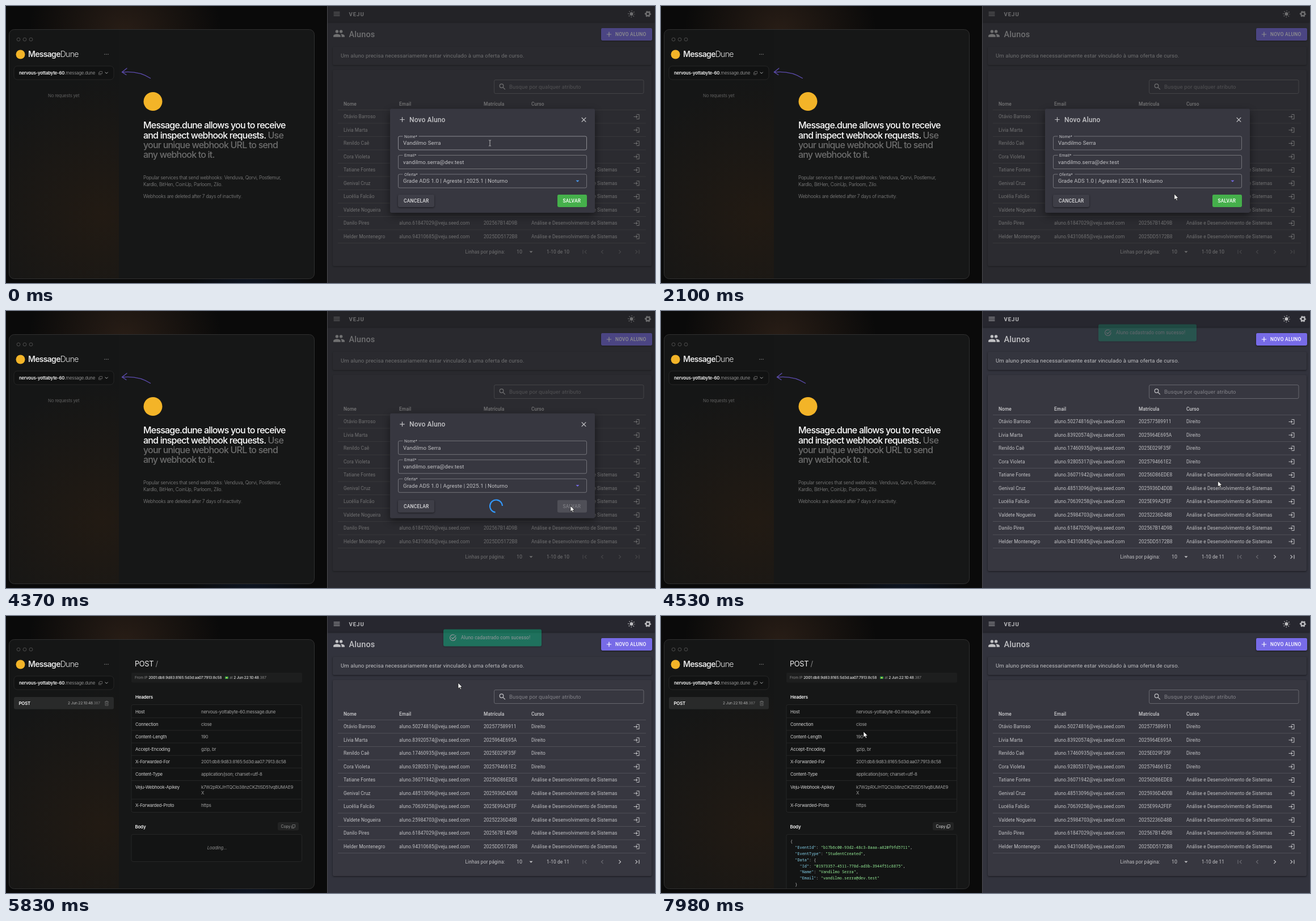
An HTML page for the animation above (8 s loop, 1144 by 489 pixels).

```html
<!DOCTYPE html>
<html lang="pt">
<head>
<meta charset="utf-8">
<title>Webhook demo</title>
<style>
  html, body { margin: 0; width: 100%; height: 100%; overflow: hidden; background: #0a0a0a; }
  svg { display: block; width: 100vw; height: 100vh; }
  text { white-space: pre; }
  .hook text { font-family: Inter, sans-serif; letter-spacing: -.025em; }
  .app text { font-family: Roboto, sans-serif; letter-spacing: .0107em; }
  .app .btn { font-weight: 500; letter-spacing: .0286em; }
  .hook .code text { font-family: "Noto Sans Mono", monospace; letter-spacing: 0; }
  .mid { font-weight: 500; }
  .bold { font-weight: 600; }
  .thin { font-weight: 300; }
</style>
</head>
<body>
<svg id="stage" viewBox="0 0 1144 489" preserveAspectRatio="none"></svg>
<script>
const LOOP = 8000;
const SOFT = '#ffffffb2', SURFACE = '#373740', PRIMARY = '#776be7', GREEN = '#45b04b';

// Markup helpers
const text = (x, y, s, size, fill = SOFT, extra = '') =>
  `<text x="${x}" y="${y}" font-size="${size}" fill="${fill}" ${extra}>${s}</text>`;
const rect = (x, y, w, h, fill, extra = '') =>
  `<rect x="${x}" y="${y}" width="${w}" height="${h}" fill="${fill}" ${extra}/>`;
const line = (x1, y, x2, color) =>
  `<path d="M${x1} ${y}H${x2}" stroke="${color}" stroke-width=".8"/>`;
const stroke = (d, color, width, extra = '') =>
  `<path d="${d}" fill="none" stroke="${color}" stroke-width="${width}" ${extra}/>`;
// Icons are drawn on a 24 unit grid and centred on x, y.
const icon = (cx, cy, scale, body, fill = SOFT) =>
  `<g transform="translate(${cx} ${cy}) scale(${scale}) translate(-12 -12)" fill="${fill}">${
    body[0] === '<' ? body : `<path d="${body}"/>`}</g>`;

const icons = {
  menu: 'M3 18h18v-2H3zm0-5h18v-2H3zm0-7v2h18V6z',
  plus: 'M19 13h-6v6h-2v-6H5v-2h6V5h2v6h6z',
  close: 'M19 6.4 17.6 5 12 10.6 6.4 5 5 6.4l5.6 5.6L5 17.6 6.4 19l5.6-5.6 5.6 5.6 1.4-1.4-5.6-5.6z',
  down: 'M7 10l5 5 5-5z',
  enter: 'M11 7 9.6 8.4l2.6 2.6H2v2h10.2l-2.6 2.6L11 17l5-5zm9 12h-8v2h8c1.1 0 2-.9 2-2V5c0-1.1-.9-2-2-2h-8v2h8z',
  first: 'M18.4 16.6 13.8 12l4.6-4.6L17 6l-6 6 6 6zM6 6h2v12H6z',
  prev: 'M15.4 7.4 14 6l-6 6 6 6 1.4-1.4-4.6-4.6z',
  next: 'M10 6 8.6 7.4l4.6 4.6-4.6 4.6L10 18l6-6z',
  last: 'M5.6 7.4l4.6 4.6-4.6 4.6L7 18l6-6-6-6zM16 6h2v12h-2z',
  people: '<circle cx="16" cy="8" r="3"/><circle cx="8" cy="8" r="3"/><path d="M8 13c-2.3 0-7 1.2-7 3.5V19h14v-2.5C15 14.2 10.3 13 8 13zm8 0-1 .1c1.2.8 2 1.9 2 3.4V19h6v-2.5C23 14.2 18.3 13 16 13z"/>',
  search: '<path d="M14.5 14.5 20 20M15 9.5a5.5 5.5 0 1 1-11 0 5.5 5.5 0 0 1 11 0z" fill="none" stroke="#ffffffb2" stroke-width="2"/>',
  sun: '<circle cx="12" cy="12" r="5"/><circle cx="12" cy="12" r="9" fill="none" stroke="#ffffffb2" stroke-width="3" stroke-dasharray="2 5.07" stroke-dashoffset="1"/>',
  gear: '<g fill="none" stroke="#ffffffb2"><circle cx="12" cy="12" r="5.5" stroke-width="4"/><circle cx="12" cy="12" r="8.4" stroke-width="2" stroke-dasharray="4.4 4.4" stroke-dashoffset="2.2"/></g>',
  check: '<path d="M20.5 10a9 9 0 1 1-4-6M7 11l4 4L21 5" fill="none" stroke="#fff" stroke-width="2"/>'
};

// Left: request inspector
const hookShell = `
  ${rect(0, 0, 566, 489, '#0a0a0a')}
  ${rect(0, 0, 566, 489, 'url(#cold)')}${rect(0, 0, 566, 489, 'url(#top)')}
  ${rect(5.5, 41.5, 538, 440, '#161717', 'rx="9"')}
  <path id="side" d="M199 42H14.5a9 9 0 0 0-9 9V472.5a9 9 0 0 0 9 9H199z" fill="#151616"/>
  <use href="#side" style="fill:url(#warm)"/><path d="M199 42H14.5a9 9 0 0 0-9 9V472.5a9 9 0 0 0 9 9H199z" fill="url(#warm)"/>
  ${rect(5.5, 41.5, 538, 440, 'none', 'rx="9" stroke="#303030"')}
  ${[22, 33, 44].map(x => `<circle cx="${x}" cy="59" r="2.9" fill="none" stroke="#5a5a5a" stroke-width=".8"/>`).join('')}
  <circle cx="25.5" cy="85.5" r="8" fill="#f3b428"/>
  ${text(39, 90.3, 'Message<tspan font-weight="300">Dune</tspan>', 14, '#e4e4e4', 'class="bold" style="letter-spacing:-.05em"')}
  ${[174, 177, 180].map(x => `<circle cx="${x}" cy="85.3" r=".7" fill="#999"/>`).join('')}
  ${rect(14, 106, 176, 24, '#111212', 'rx="6" stroke="#2b2b2b" stroke-width=".8"')}
  ${text(23, 120.6, 'nervous-yottabyte-60<tspan font-weight="400" fill="#8d8d8d">.message.dune</tspan>', 7.8, '#f2f2f2', 'class="bold"')}
  ${stroke('M165 115.5h4.5v4h-4.5zM163.5 117v4.2h4.5', '#777', .7)}
  ${stroke('M174.7 116.7l2.5 2.5 2.5-2.5', '#aaa', 1)}`;

const welcome = `
  ${text(74, 161, 'No requests yet', 7.8, '#5f5f5f')}
  <g id="arrow">${stroke('M254.5 127.5Q234 114 205 116.8M213 110 204.5 116.8 212 121.5', '#5d4cb0', 1.3, 'stroke-linecap="round"')}</g>
  <circle cx="259" cy="168.5" r="16.5" fill="#f3b428"/>
  <g class="mid">${[
    '<tspan fill="#fff">Message.dune allows you to receive</tspan>',
    '<tspan fill="#fff">and inspect webhook requests.</tspan> Use',
    'your unique webhook URL to send', 'any webhook to it.'
  ].map((s, i) => text(242, 216.3 + i * 17.3, s, 16, '#6d6d6d', 'style="letter-spacing:-.05em"')).join('')}</g>
  <g class="thin">
  ${text(242, 306, 'Popular services that send webhooks: Venduva, Qorvi, Postlemur,', 8.4, '#8a8a8a')}
  ${text(242, 318, 'Kardlo, BitHen, CoinUp, Parloom, Zilo.', 8.4, '#8a8a8a')}
  ${text(242, 338.6, 'Webhooks are deleted after 7 days of inactivity.', 8.4, '#8a8a8a')}</g>`;

const ip = '2001:db8:9d83:8165:5d3d:aa07:7913:8c58';
const headers = [
  ['Host', 'nervous-yottabyte-60.message.dune'], ['Connection', 'close'], ['Content-Length', '190'],
  ['Accept-Encoding', 'gzip, br'], ['X-Forwarded-For', ip],
  ['Content-Type', 'application/json; charset=utf-8'],
  ['Veju-Webhook-Apikey', 'k7W2pRXJHTQClo38nzCKZtISD51vqBUMAE9'], ['X-Forwarded-Proto', 'https']
];
const headerY = i => 171.6 + i * 22.15 + (i > 6 ? 10.6 : 0);
const payload = [
  '{', '  "EventId": "b17b6c00-93d2-48c3-8aaa-a820f9fd5711",', '  "EventType": "StudentCreated",',
  '  "Data": {', '    "Id": "01973357-4511-778d-ad3b-3944f51c8875",',
  '    "Name": "Vandilmo Serra",', '    "Email": "vandilmo.serra@dev.test"', '  }'
];
const paint = s => s.replace(/("[^"]*")(:?)/g, (_, word, colon) =>
  `<tspan fill="${colon ? '#86d5ee' : '#98f29a'}">${word}</tspan>${colon}`);

const request = `
  ${rect(14, 143, 176, 21.5, '#292a2a', 'rx="3"')}
  ${text(22.5, 156.8, 'POST', 7.8, '#fff', 'class="bold"')}
  ${text(109, 156.3, '2 Jun 22:10:48<tspan fill="#777">.387</tspan>', 6.6, '#b0b0b0')}
  ${stroke('M174 151.5h7M176 151.5v-1.3h3v1.3M175 151.5v6.5h5v-6.5M176.8 153.2v3.3M178.3 153.2v3.3', '#777', .7)}
  ${text(227, 89.2, 'POST <tspan fill="#888">/</tspan>', 12.8, '#f0f0f0')}
  ${rect(221, 100, 301, 17.5, '#1d1e1e', 'rx="2"')}
  ${text(227, 111.2, `From IP <tspan class="mid" fill="#ddd">${ip}</tspan>`, 6.6, '#888')}
  ${rect(386, 106.8, 6, 4.2, '#2f9e4f', 'rx=".6"')}<circle cx="389" cy="108.9" r="1.2" fill="#e3d23b"/>
  ${text(394, 111.2, 'at <tspan class="mid" fill="#ddd">2 Jun 22:10:48</tspan>.387', 6.6, '#888')}
  ${text(228, 145.5, 'Headers', 7.9, '#f4f4f4', 'class="bold"')}
  ${rect(221, 156.5, 300.5, 190, '#131414', 'rx="3" stroke="#2a2b2b" stroke-width=".8"')}
  ${headers.map(([key, value], i) =>
    text(228, headerY(i), key, 7.8, '#d2d2d2') + text(344, headerY(i), value, 7.8, '#a2a2a2') +
    (i ? line(221, headerY(i) - 14, 521.5, '#2a2b2b') : '')).join('')}
  ${text(344, 315.2, 'X', 7.8, '#a2a2a2')}
  ${text(227.5, 374.6, 'Body', 7.9, '#f4f4f4', 'class="bold"')}
  ${rect(479, 364, 37, 14.5, '#222323', 'rx="3"')}
  <g id="copy">${text(484.5, 373.6, 'Copy', 7, '#ddd')}
  ${stroke('M505 368.5h4.5v4.5h-4.5zM503.5 370v4.5h4.5', '#ccc', .7)}</g>
  <g id="loading">${rect(221, 385.5, 300.5, 48, '#131414', 'rx="3" stroke="#2a2b2b" stroke-width=".8"')}
  ${text(372, 412, 'Loading...', 7.8, '#8c8c8c', 'text-anchor="middle" font-style="italic"')}</g>
  <g id="code" class="code"><path d="M221 481V388.5a3 3 0 0 1 3-3H518.5a3 3 0 0 1 3 3V481" fill="#131414" stroke="#2a2b2b" stroke-width=".8"/>
  ${payload.map((s, i) => text(228, 400.3 + i * 10.8, paint(s), 6.9, '#c9c9c9')).join('')}</g>`;

// Right: student list
const students = [
  ['Otávio Barroso', 50274816, '202577589911'], ['Lívia Marta', 83920574, '2025964E695A'],
  ['Renildo Caê', 17460935, '2025E029F35F'], ['Cora Violeta', 92805317, '2025794661E2'],
  ['Tatiane Fontes', 36071942, '20256D86EDE8'], ['Genival Cruz', 48513096, '2025936D4D0B'],
  ['Lucélia Falcão', 70639258, '2025E99A2FEF'], ['Valdete Nogueira', 25984703, '20252236D48B'],
  ['Danilo Pires', 61847029, '202567B14D9B'], ['Helder Montenegro', 94310685, '2025DD5172B8']
];
const row = ([name, number, code], i) => {
  const y = 195 + i * 23.5;
  const course = i < 4 ? 'Direito' : 'Análise e Desenvolvimento de Sistemas';
  return [[595, name], [693, `aluno.${number}@veju.seed.com`], [842, code], [926, course]]
    .map(([x, s]) => text(x, y + 3, s, 8.4)).join('') +
    icon(1111.5, y + .5, .5, icons.enter) + line(585, y + 12, 1128, '#ffffff26');
};
const shadow = 'style="filter:drop-shadow(0 1px 1.5px #0008)"';
const page = `
  ${rect(566, 0, 578, 489, '#32333d')}
  ${rect(566, 0, 578, 28, '#27272f', shadow)}
  ${icon(583, 14, .6, icons.menu)}${text(604.5, 17.5, 'VEJU', 9.6, SOFT, 'style="font-weight:700;letter-spacing:.1em"')}
  ${icon(1102.5, 14, .6, icons.sun)}${icon(1131.5, 14, .6, icons.gear)}
  ${icon(587, 48.5, .9, icons.people)}${text(604.5, 55, 'Alunos', 14.4, SOFT, 'class="mid"')}
  ${rect(1049, 39, 90, 22, PRIMARY, 'rx="2.4" ' + shadow)}${icon(1063, 50, .6, icons.plus, '#fff')}
  ${text(1074, 53, 'NOVO ALUNO', 8.4, '#fff', 'class="btn"')}
  ${rect(576, 72, 562, 32, '#34353e', 'rx="2" ' + shadow)}
  ${text(590, 91.4, 'Um aluno precisa necessariamente estar vinculado à uma oferta de curso.', 9.6)}
  ${rect(576, 113, 562, 346, SURFACE, 'rx="2" ' + shadow)}
  ${rect(860.5, 130.5, 263.5, 24, 'none', 'rx="2.4" stroke="#ffffff4c" stroke-width=".8"')}
  ${icon(875, 142.5, .6, icons.search)}${text(887, 146, 'Busque por qualquer atributo', 9.6, '#ffffff60')}
  ${[[595, 'Nome'], [693, 'Email'], [842, 'Matrícula'], [926, 'Curso']]
    .map(([x, s]) => text(x, 175.6, s, 8.4, '#ffffffc0', 'class="mid"')).join('')}
  ${line(585, 183.5, 1128, '#ffffff26')}${students.map(row).join('')}
  ${text(809.5, 437, 'Linhas por página:', 8.4)}${text(900, 437, '10', 8.9)}${icon(925.5, 434, .6, icons.down)}
  ${text(953, 437, '1-10 de <tspan id="total">10</tspan>', 8.4)}
  ${icon(1020, 434, .6, icons.first, '#ffffff42')}${icon(1051, 434, .6, icons.prev, '#ffffff42')}
  <g id="forward">${icon(1082, 434, .6, icons.next)}${icon(1113, 434, .6, icons.last)}</g>`;

const field = (id, y, label, notch, value) => `
  ${rect(691.5, y, 332, 24, 'none', `id="${id}" rx="2.4"`)}
  ${rect(699.5, y - 1.5, notch, 3, SURFACE)}
  ${text(702, y + 2.6, label, 7.2, SOFT, `id="${id}Label"`)}
  ${text(700, y + 15.4, value, 9.6, SOFT, `id="${id}Value"`)}`;
const dialog = `
  ${rect(566, 0, 578, 489, '#212121', 'opacity=".5"')}
  <rect id="panel" x="677" width="361" rx="2.4" fill="${SURFACE}" style="filter:drop-shadow(0 5px 7px #0007)"/>
  <g id="form">${icon(698.5, 200.5, .6, icons.plus)}${text(711, 205, 'Novo Aluno', 12, SOFT, 'class="mid"')}
  ${icon(1018.5, 200.8, .6, icons.close)}
  ${field('name', 230, 'Nome*', 28, 'Vandilmo Serra')}
  ${field('email', 263.5, 'Email*', 27, 'vandilmo.serra@dev.test')}
  ${field('offer', 297, 'Oferta*', 30, 'Grade ADS 1.0 | Agreste | 2025.1 | Noturno')}
  <g id="offerArrow">${icon(1007.5, 309, .6, icons.down, 'inherit')}</g>
  ${rect(0, 270.5, .8, 10, '#eee', 'id="caret"')}</g>
  <g id="actions">${rect(691, 333, 64, 22, '#3e3e47', 'rx="2.4" ' + shadow)}
  ${text(701, 347, 'CANCELAR', 8.4, '#ffffffd0', 'class="btn"')}
  ${rect(972, 333, 52, 22, GREEN, 'id="save" rx="2.4"')}
  ${text(981.5, 347, 'SALVAR', 8.4, '#fff', 'id="saveText" class="btn"')}</g>
  <circle id="spinner" r="11" fill="none" stroke="#3299ff" stroke-width="2.2" pathLength="126"/>`;
const toast = `
  ${rect(771, 23.5, 173, 30, '#0bba83', 'rx="2.4" opacity=".95" ' + shadow)}
  ${icon(788, 38.5, .58, icons.check, '#fff')}
  ${text(802, 41.2, 'Aluno cadastrado com sucesso!', 8.4, '#fff')}`;

const pointers = `
  <path id="arrowPointer" d="M0 0V10.2L2.4 8 4 11.6 5.7 10.9 4.1 7.4H7.3z" fill="#fff" stroke="#111" stroke-width=".7"/>
  <path id="handPointer" d="M-.9.8Q0-.5.9.8V5Q2 4.3 2.6 5.3 3.8 4.7 4.3 5.7 5.6 5.3 5.9 6.5V9.5L5 12.5H-.3L-3.5 8.2Q-3.2 6.6-1.5 7.7L-.9 8.3z" fill="#fff" stroke="#222" stroke-width=".6"/>
  <path id="textPointer" d="M-2-5H-.5L0-4.5.5-5H2M0-4.5V4.5M-2 5H-.5L0 4.5.5 5H2" fill="none" stroke="#c4c4c4" stroke-width=".9"/>`;

const glow = (id, x, y, r, color, alpha) => `<radialGradient id="${id}" gradientUnits="userSpaceOnUse" cx="${x}" cy="${y}" r="${r}">
  <stop stop-color="${color}" stop-opacity="${alpha}"/><stop offset="1" stop-color="${color}" stop-opacity="0"/></radialGradient>`;
document.getElementById('stage').innerHTML = `
  <defs>${glow('warm', 170, 370, 240, '#33200f', .42)}${glow('cold', 430, 500, 110, '#10203c', .5)}
  ${glow('top', 210, 50, 170, '#33241a', .75)}</defs>
  <g class="hook">${hookShell}<g id="welcome">${welcome}</g><g id="request">${request}</g></g>
  <g class="app">${page}<g id="dialog">${dialog}</g><g id="toast">${toast}</g></g>
  ${rect(566, 0, .8, 489, '#55555a')}
  <g id="pointer">${pointers}</g>`.replace(/<use[^>]*>/, '');

// Motion
const $ = id => document.getElementById(id);
const set = (id, attrs) => { for (const key in attrs) $(id).setAttribute(key, attrs[key]); };
const show = (id, on) => set(id, { visibility: on ? 'inherit' : 'hidden' });
const ramp = (t, from, to) => Math.min(1, Math.max(0, (t - from) / (to - from)));
const ease = p => p * p * (3 - 2 * p);

const FOCUS = 450, SELECT = 1450, SAVE = 3640, SAVED = 4480, RECEIVED = 5300, LOADED = 6050;
const route = [
  [0, 853, 242], [100, 853, 242], [450, 856, 273], [850, 858, 276], [1180, 876, 311], [1400, 876, 311],
  [2140, 905, 332], [2900, 960, 343], [3250, 960, 343], [3500, 995, 344], [4400, 995, 344],
  [4950, 902, 38], [5590, 902, 38], [5830, 797, 118], [6360, 300, 95], [6700, 232, 76],
  [7170, 268, 98], [7300, 245, 106], [7600, 405, 165], [7940, 357, 204], [LOOP, 357, 204]
];
function pointerAt(t) {
  const i = route.findIndex(stop => stop[0] > t);
  const [t0, x0, y0] = route[i - 1], [t1, x1, y1] = route[i];
  const p = ease(ramp(t, t0, t1));
  return [x0 + (x1 - x0) * p, y0 + (y1 - y0) * p];
}
function pointerKind(t, x, y) {
  if (t < 1000 || (t > 4880 && t < 5640)) return 'text';
  if ((t < 2140 && y > 297 && y < 321) || (x > 972 && t < SAVE)) return 'hand';
  return 'arrow';
}
const caretX = 700 + $('emailValue').getComputedTextLength();

function draw(t) {
  const [x, y] = pointerAt(t), kind = pointerKind(t, x, y);
  set('pointer', { transform: `translate(${x} ${y})` });
  for (const name of ['arrow', 'hand', 'text']) show(name + 'Pointer', kind === name);

  const nudge = ramp((t + 1380) % 1500, 0, 720);
  set('arrow', { transform: `translate(${-8 * Math.sin(Math.PI * nudge) ** 3} 0)` });

  const busy = t >= SAVE, grow = busy ? .7 : 0, focused = t >= FOCUS && t < SELECT;
  show('dialog', t < SAVED);
  set('panel', { y: 181.5 - grow, height: 183.5 + 2 * grow });
  set('form', { transform: `translate(0 ${-grow})` });
  set('actions', { transform: `translate(0 ${grow})` });
  for (const [id, top] of [['name', 230], ['email', 263.5], ['offer', 297]]) {
    const active = id === 'email' && focused, hover = x < 1023 && y > top && y < top + 24;
    set(id, { stroke: active ? PRIMARY : hover ? '#ffffff88' : '#ffffff60', 'stroke-width': active ? 1.3 : .8 });
    set(id + 'Label', { fill: active ? PRIMARY : SOFT });
  }
  set('offerArrow', { fill: t < SELECT ? '#4a9cf5' : PRIMARY });
  set('caret', { x: caretX });
  show('caret', focused && (t - FOCUS + 200) % 1000 < 500 || focused && t > 1150);
  set('save', { fill: busy ? '#ffffff1f' : GREEN });
  set('saveText', { fill: busy ? '#ffffff42' : '#fff' });

  show('spinner', busy && t < SAVED);
  const p = Math.max(0, t - SAVE) % 1400 / 1400;
  const first = ease(ramp(p, 0, .5)), second = ease(ramp(p, .5, 1));
  const start = 15 * first + 110 * second, length = Math.min(1 + 90 * first, 126 - start);
  set('spinner', {
    transform: `translate(864 344.5) rotate(${360 * p - 135})`,
    'stroke-dasharray': `${length} 200`, 'stroke-dashoffset': -start
  });

  $('total').textContent = t < SAVED ? '10' : '11';
  set('forward', { opacity: t < SAVED ? .37 : 1 });
  set('toast', { opacity: ramp(t, SAVED, 4680) * (1 - ramp(t, 5600, 6050)) });
  show('welcome', t < RECEIVED);
  show('request', t >= RECEIVED);
  show('loading', t < LOADED);
  show('code', t >= LOADED);
  set('copy', { opacity: t < LOADED ? .6 : 1 });
}
const begin = performance.now();
function tick() {
  draw((performance.now() - begin) % LOOP);
  requestAnimationFrame(tick);
}
tick();
</script>
</body>
</html>
```
